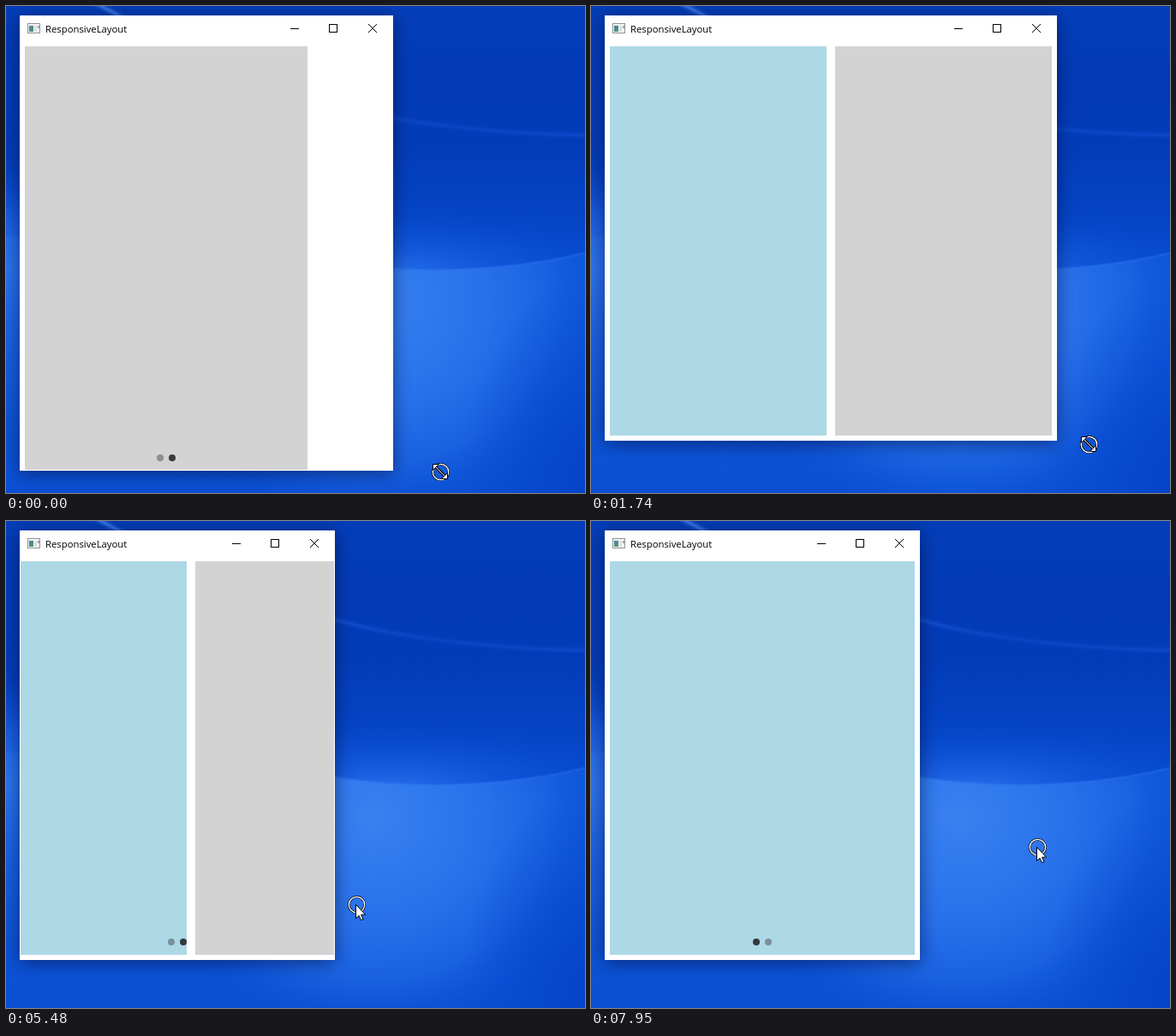
Recreate the animation shown at these times as an HTML page with a canvas. Size 676 px wide and 568 px high, loop 8000 ms.

```html
<!DOCTYPE html>
<html lang="en">
<head>
<meta charset="utf-8">
<title>ResponsiveLayout</title>
<style>
  html, body { margin: 0; width: 100%; height: 100%; overflow: hidden; background: #0440bd; }
  canvas { display: block; }
</style>
</head>
<body>
<canvas id="stage" width="676" height="568"></canvas>
<script>
const W = 676, H = 568, LOOP = 8000, FRAME = 125;
const LEFT = 16, TOP = 11, PAD = 6, GAP = 10, BODY_TOP = 47, BREAK = 490;
const LAG = 60, LATE = 112, RELEASE = 2950, SLIDE = 548;
const BLUE = '#add8e6', GRAY = '#d3d3d3';
const ctx = document.getElementById('stage').getContext('2d');

// The pointer's stops: time, x, y. Everything else follows from them.
const STOPS = [
  [-150, 270, 557], [0, 507, 543], [360, 631, 555], [880, 631, 533], [1030, 411, 519],
  [1310, 309, 516], [1590, 430, 511], [1740, 581, 511], [2160, 643, 522], [2670, 400, 510],
  [RELEASE, 389, 516], [3680, 184, 494], [4180, 184, 494], [4420, 205, 450], [4670, 205, 456],
  [5050, 3, 452], [5190, 238, 446], [5480, 408, 447], [5850, 521, 440], [6370, 340, 404],
  [6930, 28, 398], [7190, 28, 398], [7830, 520, 380], [LOOP, 520, 380]
];

const clamp = v => Math.min(1, Math.max(0, v));
const easeOut = p => 1 - (1 - p) ** 1.7;
const smooth = p => p * p * (3 - 2 * p);
const within = (t, ...spans) => spans.some(([a, b]) => t >= a && t < b);

function leg(t) {
  const i = Math.max(1, STOPS.findIndex(s => s[0] > t));
  return [STOPS[i - 1], STOPS[i]];
}

function pointer(t) {
  const [a, b] = leg(t), p = easeOut((t - a[0]) / (b[0] - a[0]));
  return { x: a[1] + (b[1] - a[1]) * p, y: a[2] + (b[2] - a[2]) * p };
}

// Each leg is shown in equal steps of about one FRAME.
function step(t) {
  const [[a], [b]] = leg(t), n = Math.max(1, Math.round((b - a) / FRAME));
  return a + Math.floor((t - a) / (b - a) * n) * (b - a) / n;
}

// The window corner trails the pointer until the button is released.
function corner(t, lag) {
  const p = pointer(Math.min(t - lag, RELEASE));
  return { right: Math.round(p.x - 5), bottom: Math.round(p.y - 4) };
}

// Page shift from 0 (gray page) to 1 (blue page).
const slide = (t, from) => smooth(clamp((t - from) / SLIDE));
const shift = t => slide(t, 5190) - slide(t, 6370) + slide(t, 7190);
const pressed = t => within(t, [0, RELEASE], [4670, 5050], [5190, 5900], [6370, 6930], [7200, LOOP]);

function fade(g, ...colors) {
  colors.forEach((c, i) => g.addColorStop(i / (colors.length - 1), c));
  return g;
}

function makeWallpaper() {
  const c = document.createElement('canvas');
  c.width = W;
  c.height = H;
  const g = c.getContext('2d');
  const fill = style => { g.fillStyle = style; g.fillRect(0, 0, W, H); };
  const glow = (x, y, rx, ry, ...colors) => {
    g.save();
    g.translate(x, y);
    g.scale(rx, ry);
    g.fillStyle = fade(g.createRadialGradient(0, 0, 0, 0, 0, 1), ...colors);
    g.fillRect(-1, -1, 2, 2);
    g.restore();
  };
  const horizon = () => {
    g.beginPath();
    g.moveTo(0, 270);
    g.lineTo(340, 290);
    g.bezierCurveTo(430, 311, 560, 316, W, 288);
  };
  const arc = () => {
    g.beginPath();
    g.moveTo(100, -6);
    g.quadraticCurveTo(240, 72, 385, 115);
    g.bezierCurveTo(460, 138, 580, 149, W, 151);
  };

  fill(fade(g.createLinearGradient(0, 0, 0, 320), '#033eb8', '#033bb6', '#033cb8', '#0444c4', '#084dd2'));
  glow(450, 312, 300, 85, 'rgba(44,116,240,.85)', 'rgba(24,94,226,.4)', 'rgba(4,70,205,0)');
  glow(0, 305, 130, 130, '#2c76ee', 'rgba(28,98,228,.75)', 'rgba(4,66,195,0)');

  g.strokeStyle = fade(g.createLinearGradient(100, 0, W, 0),
    'rgba(90,160,255,.7)', 'rgba(50,120,245,.5)', 'rgba(20,90,225,.3)', 'rgba(24,94,228,.4)');
  [9, 5, 2.5].forEach((w, i) => {
    g.globalAlpha = .2 + .15 * i;
    g.lineWidth = w;
    arc();
    g.stroke();
  });
  g.globalAlpha = 1;

  g.save();
  horizon();
  g.lineTo(W, H);
  g.lineTo(0, H);
  g.clip();
  fill(fade(g.createLinearGradient(0, 290, 0, H), '#0e56d8', '#0f57d9', '#0a4fd2'));
  glow(430, 345, 270, 255, '#3a80f0', '#2f79ee', '#2870ea', 'rgba(30,102,228,.75)', 'rgba(14,84,218,0)');
  glow(0, 305, 150, 200, '#2c76ee', 'rgba(20,92,222,0)');
  glow(W + 20, H, 170, 260, '#0442c4', 'rgba(4,70,203,.6)', 'rgba(8,76,212,0)');
  g.restore();

  g.strokeStyle = 'rgba(40,112,238,.35)';
  g.lineWidth = 3;
  horizon();
  g.stroke();
  return c;
}
const wallpaper = makeWallpaper();

function rect(x, y, w, h, color) {
  ctx.fillStyle = color;
  ctx.fillRect(x, y, w, h);
}

function path(...pts) {
  ctx.beginPath();
  pts.forEach(([x, y]) => ctx.lineTo(x, y));
}

function stroke(color, width) {
  ctx.strokeStyle = color;
  ctx.lineWidth = width;
  ctx.stroke();
}

function disc(x, y, r, color) {
  ctx.fillStyle = color;
  ctx.beginPath();
  ctx.arc(x, y, r, 0, Math.PI * 2);
  ctx.fill();
}

function drawFrame({ right, bottom }) {
  ctx.save();
  ctx.shadowColor = 'rgba(0,0,30,.5)';
  ctx.shadowBlur = 20;
  ctx.shadowOffsetY = 3;
  rect(LEFT, TOP, right - LEFT, bottom - TOP, '#fff');
  ctx.restore();

  // Window icon
  rect(25, 20, 15, 12, '#8d9496');
  rect(26, 21, 13, 10, '#f4f4f4');
  rect(27, 23, 5, 7, fade(ctx.createLinearGradient(27, 23, 32, 30), '#4a7f95', '#4f9a78'));
  rect(33, 23, 3, 7, '#dcdfe0');
  rect(37, 23, 2, 3, '#9aa6ae');

  ctx.fillStyle = '#000';
  ctx.font = '11.3px "Open Sans", "Noto Sans", sans-serif';
  ctx.fillText('ResponsiveLayout', 46, 31);

  // Caption buttons
  rect(right - 120, 26, 10, 1, '#000');
  ctx.strokeStyle = '#000';
  ctx.lineWidth = 1;
  ctx.strokeRect(right - 74.5, 21.5, 9, 9);
  path([right - 29, 21], [right - 19, 31]);
  stroke('#000', 1);
  path([right - 19, 21], [right - 29, 31]);
  stroke('#000', 1);
}

function drawBody(t, frame, body) {
  const x = LEFT + PAD, w = body.right - PAD - x;
  const end = body.bottom - PAD, h = end - BODY_TOP;
  ctx.save();
  ctx.beginPath();
  ctx.rect(LEFT + 1, BODY_TOP, frame.right - LEFT - 2, frame.bottom - BODY_TOP - 1);
  ctx.clip();
  if (body.right > BREAK) {
    const col = Math.round((w - GAP) / 2);
    rect(x, BODY_TOP, col, h, BLUE);
    rect(x + col + GAP, BODY_TOP, w - col - GAP, h, GRAY);
  } else {
    const off = Math.round(shift(t) * (w + GAP)), page = shift(t) > .6 ? 0 : 1;
    rect(x + off - w - GAP, BODY_TOP, w, h, BLUE);
    rect(x + off, BODY_TOP, w, h, GRAY);
    for (let i = 0; i < 2; i++) {
      disc(x + w / 2 - 7 + 14 * i, end - 15, 4, `rgba(40,40,40,${i === page ? .9 : .4})`);
    }
  }
  ctx.restore();
}

function drawRing(x, y) {
  ctx.beginPath();
  ctx.arc(x, y, 9.2, 0, Math.PI * 2);
  stroke('#111', 2.8);
  stroke('#fff', 1.3);
}

function drawResizer() {
  const shaft = () => path([-5, -5], [5, 5]);
  shaft();
  stroke('#000', 3);
  ctx.fillStyle = '#fff';
  [8.5, -8.5].forEach(s => {
    path([s, s], [s * .2, s], [s, s * .2], [s, s]);
    ctx.fill();
    stroke('#000', 1);
  });
  shaft();
  stroke('#fff', 1);
}

function drawArrow() {
  path([.5, .5], [.5, 16.5], [4, 13.2], [6.5, 18.5], [9, 17.5], [6.6, 12.2], [11.5, 12]);
  ctx.closePath();
  ctx.fillStyle = '#fff';
  ctx.fill();
  stroke('#000', 1);
}

function drawPointer(t) {
  const { x, y } = pointer(t), resizing = t < RELEASE + 2 * FRAME;
  ctx.save();
  ctx.translate(Math.round(x), Math.round(y));
  if (pressed(t)) drawRing(resizing ? .5 : 1.5, .5);
  if (resizing) drawResizer();
  else drawArrow();
  ctx.restore();
}

function draw(time) {
  const t = step(time % LOOP), frame = corner(t, LAG);
  ctx.drawImage(wallpaper, 0, 0);
  drawFrame(frame);
  // The contents are laid out late when the drag sets in.
  drawBody(t, frame, corner(t, t < FRAME / 2 ? LATE : LAG));
  drawPointer(t);
}

const start = performance.now();
function loop() {
  draw(performance.now() - start);
  requestAnimationFrame(loop);
}
loop();
</script>
</body>
</html>
```
